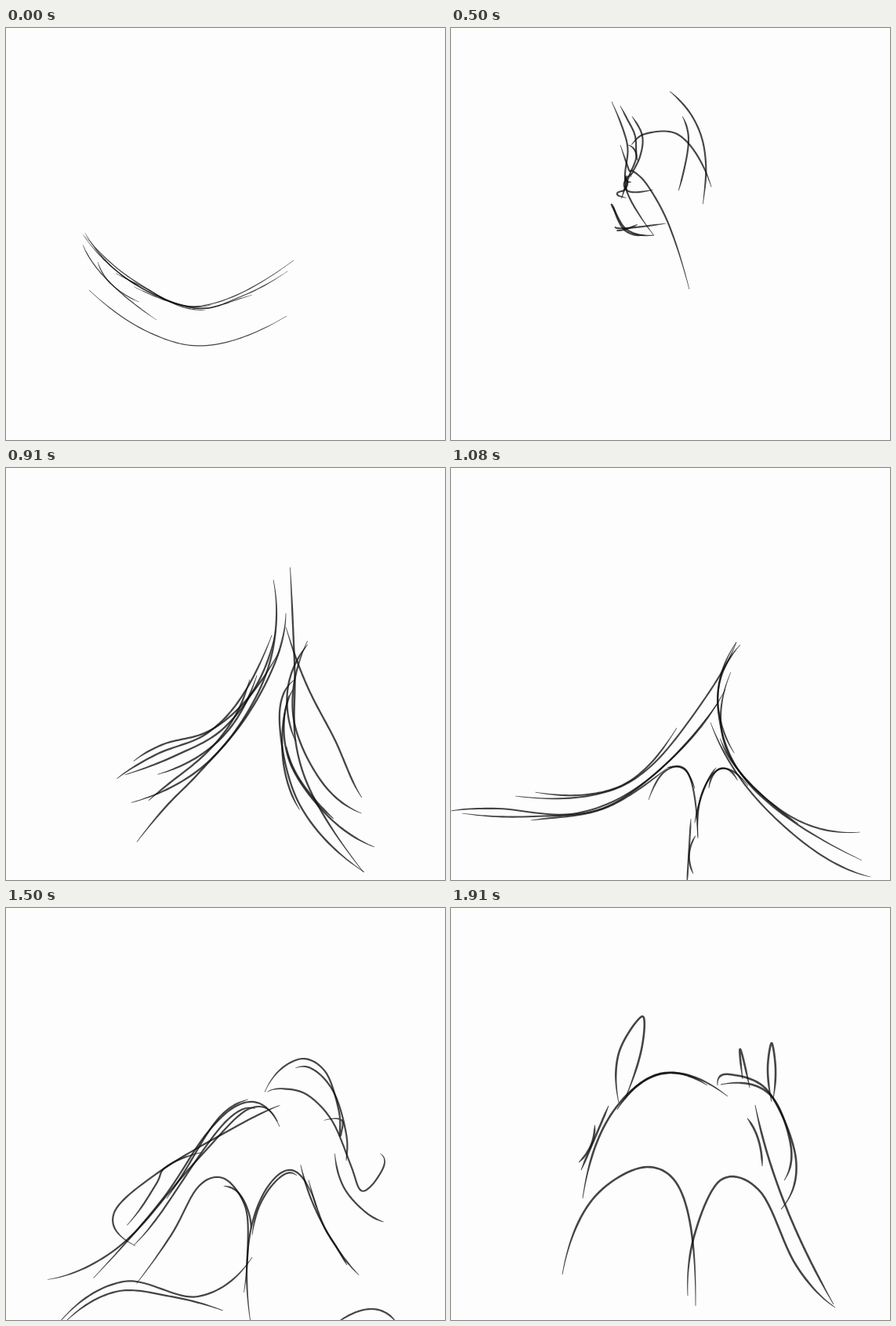
These frames come from a looping animation (560x525 px, 2000 ms). An HTML page with a canvas:

```html
<!DOCTYPE html>
<html lang="en">
<head>
<meta charset="utf-8">
<title>Pencil morph</title>
<style>
html, body { margin: 0; width: 100%; height: 100%; overflow: hidden; background: #fdfdfd; }
canvas { display: block; }
</style>
</head>
<body>
<canvas id="stage" width="560" height="525"></canvas>
<script>
const ctx = document.getElementById('stage').getContext('2d');
const LOOP = 2000, SAMPLES = 56, PARTS = 'abcde';
const poses = [];

let seed = 7;
function random() {
  seed = seed * 16807 % 2147483647;
  return seed / 2147483647;
}

const lerp = (p, q, u) => p + (q - p) * u;

function curve(p0, p1, p2, p3, t) {
  return p1 + t / 2 * (p2 - p0 + t * (2 * p0 - 5 * p1 + 4 * p2 - p3 + t * (3 * (p1 - p2) + p3 - p0)));
}

// Smooth curve through a few points; the ends continue as parabolas.
function sample(text) {
  const n = text.trim().split(/\s+/).map(Number), last = n.length / 2 - 1;
  const at = (k, axis) => n[2 * k + axis];
  const extend = (k, step, axis) => last < 2
    ? 2 * at(k, axis) - at(k + step, axis)
    : 3 * at(k, axis) - 3 * at(k + step, axis) + at(k + 2 * step, axis);
  const coord = (k, axis) => k < 0 ? extend(0, 1, axis) : k > last ? extend(last, -1, axis) : at(k, axis);
  return Array.from({ length: SAMPLES + 1 }, (_, i) => {
    const s = i / SAMPLES * last, k = Math.min(last - 1, Math.floor(s));
    return [0, 1].map(axis => curve(coord(k - 1, axis), coord(k, axis),
      coord(k + 1, axis), coord(k + 2, axis), s - k));
  });
}

// A second pencil pass over part of a stroke, drifting away at its ends.
function echo(stroke) {
  const begin = random() * 0.4, span = 0.4 + random() * 0.2;
  const drift = (random() < 0.5 ? -1 : 1) * (3 + random() * 4), shift = random() * 2 - 1;
  return stroke.map((_, i) => {
    const k = (begin + span * i / SAMPLES) * SAMPLES, j = Math.min(SAMPLES - 1, Math.floor(k));
    const [ax, ay] = stroke[j], [bx, by] = stroke[j + 1];
    const length = Math.hypot(bx - ax, by - ay) || 1;
    const away = shift + drift * (2 * i / SAMPLES - 1) ** 2;
    return [lerp(ax, bx, k - j) - (by - ay) / length * away,
      lerp(ay, by, k - j) + (bx - ax) / length * away];
  });
}

// at: drawing index; lift: stretch on the way to the next pose; echoes: one letter per extra pass.
// Parts: a left contour, b right contour, c and d inner arches, e extras.
function pose(at, width, lift, echoes, shapes) {
  const made = { at, width, lift };
  for (const part of PARTS) {
    const strokes = shapes[part] ? shapes[part].split('/').map(sample) : [];
    const passes = echoes.split(part).length - 1;
    const extra = Array.from({ length: passes }, (_, i) => echo(strokes[i % strokes.length]));
    made[part] = strokes.concat(extra);
  }
  poses.push(made);
}

pose(0, 1.25, 0, 'aaab', {
  a: '98 263 158 322 240 357 300 342 359 310 / 101 265 170 326 250 354 367 296',
  b: '98 276 130 322 192 372 / 106 334 185 389 262 404 358 367'
});
pose(3, 1.8, 0, 'aaaabb', {
  a: '114 235 101 205 101 150 135 75 222 32 300 62 356 131 / 102 150 135 60 198 0 / 220 29 262 27 310 50 354 107',
  b: '49 157 65 86 129 -2 / 55 186 72 100 130 -4'
});
pose(9, 2.5, 0, 'aaaaabbbb', {
  a: '318 63 347 140 355 215 330 290 280 370 256 440 252 535 / 350 148 352 240 300 345 237 435',
  b: `361 31 390 130 393 210 370 310 359 400 388 530 / 372 318 357 340 367 455 390 530 /
    412 181 380 265 370 350 385 416 / 364 320 376 410 418 502`
});
pose(13, 2.1, 54, 'aabbccdd', {
  a: `364 222 325 292 255 380 185 416 82 418 / 350 282 290 362 200 431 105 444 14 440 /
    340 300 250 398 160 440 60 434 0 437`,
  b: '364 222 341 310 385 408 524 500 / 357 260 352 360 430 442 522 464 / 331 324 380 410 460 485 535 521',
  c: '252 423 275 385 303 390 315 470 / 306 447 301 530',
  d: '379 405 345 383 320 415 315 472'
});
pose(15, 2.2, 0, 'aabbcd', {
  a: `362 318 340 264 270 332 165 413 / 357 305 335 288 270 375 190 455 110 472 48 417 /
    345 262 270 345 165 418 95 419 160 423 / 192 405 160 422 191 407 162 425`,
  b: `338 264 365 258 390 320 416 395 / 345 264 375 370 450 460 560 480 /
    385 382 398 416 402 405 385 380 / 380 385 430 475 500 506 562 470`,
  c: '249 427 285 376 310 415 307 450',
  d: '382 418 348 372 312 440 325 528',
  e: '68 528 150 476 245 495 314 445 / 75 528 140 489 210 495 277 513 / 420 530 465 511 498 528'
});
pose(19, 2.2, 26, 'aaabbd', {
  a: '336 239 270 228 198 290 145 400 58 530 / 354 241 315 213 225 255 180 360 170 438',
  b: `322 205 355 155 405 131 450 160 472 235 465 266 459 235 450 175 395 146 /
    387 311 425 425 485 530 / 459 241 420 245 402 330`,
  c: '84 530 155 440 205 335 258 300 300 345 305 430 300 530 / 284 315 310 360 317 393',
  d: '410 343 375 296 330 330 306 415 299 530'
});
pose(22, 2.6, 0, 'aa', {
  a: '353 240 270 211 203 265 168 370 / 201 252 166 334',
  b: `340 226 355 212 405 234 440 320 421 384 / 344 225 405 236 433 300 425 347 /
    388 251 425 375 488 505 / 378 268 392 295 397 329`,
  c: '142 467 180 372 250 330 297 370 312 507',
  d: '490 509 440 455 395 362 345 346 311 415 302 494',
  e: `214 248 214 185 244 138 243 180 222 243 / 372 218 369 180 381 229 /
    409 247 404 205 409 172 414 205 411 243`
});

// Blend two sets of strokes; spare strokes share a partner.
function blend(from, to, u) {
  if (u === 0) return from;
  if (!from.length || !to.length) return u > 0.5 ? to : from;
  const count = Math.max(from.length, to.length);
  const pick = (set, i) => set[Math.floor(i * set.length / count)];
  return Array.from({ length: count }, (_, i) => {
    const q = pick(to, i);
    return pick(from, i).map(([x, y], k) => [lerp(x, q[k][0], u), lerp(y, q[k][1], u)]);
  });
}

// One pencil stroke with tapered ends.
function drawStroke(points, width) {
  const left = [], right = [];
  points.forEach(([x, y], i) => {
    const [ax, ay] = points[Math.max(0, i - 1)];
    const [bx, by] = points[Math.min(SAMPLES, i + 1)];
    const length = Math.hypot(bx - ax, by - ay) || 1;
    const taper = 0.3 + 0.7 * Math.min(1, 2.4 * Math.sin(Math.PI * i / SAMPLES));
    const h = width * taper / 2 / length;
    left.push([x - (by - ay) * h, y + (bx - ax) * h]);
    right.unshift([x + (by - ay) * h, y - (bx - ax) * h]);
  });
  ctx.beginPath();
  for (const [x, y] of left.concat(right)) ctx.lineTo(x, y);
  ctx.fill();
}

function draw(index) {
  let k = poses.length - 1;
  while (poses[k].at > index) k--;
  const from = poses[k], to = poses[k + 1] || from;
  const u = to === from ? 0 : (index - from.at) / (to.at - from.at);
  const lift = from.lift * Math.sin(Math.PI * u) / 300;
  const width = lerp(from.width, to.width, u);
  ctx.fillStyle = '#fdfdfd';
  ctx.fillRect(0, 0, 560, 525);
  ctx.fillStyle = 'rgba(12, 12, 12, 0.76)';
  for (const part of PARTS)
    for (const stroke of blend(from[part], to[part], u))
      drawStroke(stroke.map(([x, y]) => [x, y - lift * Math.max(0, 525 - y)]), width);
}

// 24 slots per loop on a 10 ms grid; the mound is held for two slots.
function drawingAt(t) {
  const slot = Math.ceil((Math.floor(t / 10) + 1) * 3 / 25) - 1;
  return slot > 15 ? slot - 1 : slot;
}

const start = performance.now();
let shown = -1;
function tick() {
  const index = drawingAt((performance.now() - start) % LOOP);
  if (index !== shown) draw(shown = index);
  requestAnimationFrame(tick);
}
tick();
</script>
</body>
</html>
```
